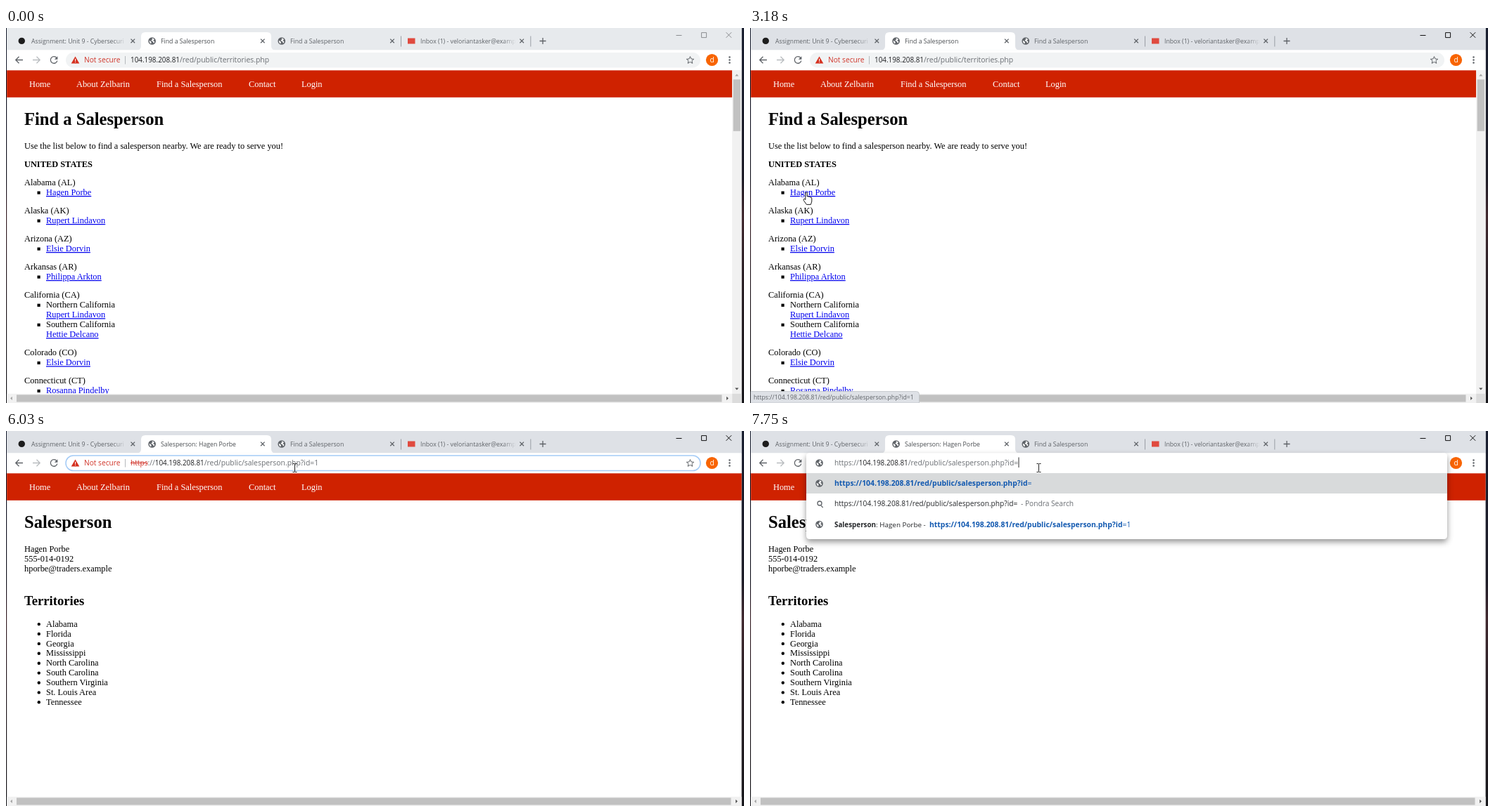
Recreate the animation shown at these times as an HTML page. Size 1049 px wide and 534 px high, loop 8000 ms.

```html
<!DOCTYPE html>
<html lang="en">
<head>
<meta charset="utf-8">
<title>Find a Salesperson</title>
<style>
  html, body { margin: 0; width: 100%; height: 100%; overflow: hidden; background: #fff; }
  svg { display: block; width: 100%; height: 100%; }
  text { white-space: pre; }
  .serif { font: 12.38px "Liberation Serif", "Times New Roman", serif; }
  .ui { font: 10.2px "Open Sans", "Noto Sans", sans-serif; fill: #26282b; }
  .small { font-size: 8.72px; }
  .h1 { font-size: 24.6px; font-weight: 700; }
  .h2 { font-size: 18.65px; font-weight: 700; }
  .b { font-weight: 700; }
  .nav { fill: #fff; }
  .link { fill: #0000ee; text-decoration: underline; }
  .host { fill: #202124; font-size: 9.9px; }
  .path { fill: #6a6e73; font-size: 10.4px; }
  .picked .host, .picked .path { fill: #202124; }
  .struck { fill: #d0342a; text-decoration: line-through; }
  .blue { fill: #1259b0; font-weight: 700; font-size: 10.4px; }
  .match { font-size: 9.85px; }
  .thin { font-weight: 400; }
  .grey { fill: #6a6e73; }
  .line { fill: none; stroke: #5f6368; stroke-width: 1.3; }
  #popup .sheet { filter: drop-shadow(0 4px 4px rgba(0, 0, 0, .42)); }
</style>
</head>
<body>
<svg id="stage" viewBox="0 0 1049 534" preserveAspectRatio="none"></svg>
<script>
const LOOP = 8000;
const PERSON = 'Hagen Porbe';
const HOST = '104.198.208.81';
const DIR = '/red/public/';
const PROFILE = DIR + 'salesperson.php?id=';

const rect = (x, y, w, h, fill, more = '') =>
  `<rect x="${x}" y="${y}" width="${w}" height="${h}" fill="${fill}" ${more}/>`;
const circle = (x, y, r, fill) => `<circle cx="${x}" cy="${y}" r="${r}" fill="${fill}"/>`;
const path = (d, more = 'class="line"') => `<path d="${d}" ${more}/>`;
const text = (x, y, cls, s, more = '') => `<text x="${x}" y="${y}" class="${cls}" ${more}>${s}</text>`;
const span = (cls, s) => `<tspan class="${cls}">${s}</tspan>`;
const group = (id, body, more = '') => `<g id="${id}" ${more}>${body}</g>`;
const serif = (x, y, s, cls = '') => text(x, y, 'serif ' + cls, s);
const fade = (id, x1, x2) =>
  `<linearGradient id="${id}" gradientUnits="userSpaceOnUse" x1="${x1}" x2="${x2}" y1="0" y2="0">
   <stop offset="0" stop-color="#5f6368"/><stop offset="1" stop-color="#5f6368" stop-opacity="0"/></linearGradient>`;

const globe = (x, y) => `<g transform="translate(${x} ${y})">` + circle(0, 0, 5.3, '#5f6368') +
  path('M-4 -.7L-1.7 .6L-.9 2L-1.6 3.9Q-4 2.8 -4 -.7ZM-.2 -3.9Q2 -4.2 3.3 -2.2L1.6 -.8L3.6 1Q3.4 2.4 2.2 3.2L1.4 1L-.4 0L-1.2 -1.2L.6 -2.2Z', 'fill="#fff"') + '</g>';
const cross = (x, y, r) => path(`M${x - r} ${y - r}l${2 * r} ${2 * r}M${x + r} ${y - r}l${-2 * r} ${2 * r}`);
const triangle = (x, y, dx, dy, fill) =>
  path(dx ? `M${x + dx} ${y}l${-2 * dx} -2.6v5.2Z` : `M${x} ${y + dy}l-2.6 ${-2 * dy}h5.2Z`, `fill="${fill}"`);

function address(x, y, scheme, file) {
  return text(x, y, 'ui', scheme + span('host', HOST) + span('path', file));
}

function desktop() {
  return `<linearGradient id="wall" x1="0" x2="0" y1="0" y2="1">
    <stop offset="0" stop-color="#1a1f30"/><stop offset=".4" stop-color="#1c1b26"/>
    <stop offset=".5" stop-color="#40282e"/><stop offset=".65" stop-color="#2b2026"/>
    <stop offset="1" stop-color="#17171b"/></linearGradient>` +
    rect(0, 0, 1049, 534, 'url(#wall)') + rect(1.2, 0, 1044.4, 534, '#fff');
}

function tabs() {
  const title = (x, s, fill = '#5f6368') => text(x, 21.8, 'ui small', s, `style="fill:${fill}"`);
  return fade('fadeA', 152, 171) + fade('fadeB', 706, 725) +
    rect(1.2, 0, 1044.4, 31.5, '#dee1e6', 'id="strip"') +
    path('M186 31.5Q192 31.5 192 25.5V12Q192 6 198 6H371Q377 6 377 12V25.5Q377 31.5 383 31.5Z', 'fill="#fff"') +
    circle(22.3, 18.4, 4.7, '#1d1d1d') + title(36, 'Assignment: Unit 9 - Cybersecuri', 'url(#fadeA)') +
    globe(207.6, 18.5) + group('tabA', title(220, 'Find a Salesperson', '#4a4e52')) +
    group('tabB', title(220, 'Salesperson: ' + PERSON, '#4a4e52')) +
    globe(391.8, 18.5) + title(404, 'Find a Salesperson') +
    rect(571, 14.5, 10.5, 8, '#e04a3f') + title(589, 'Inbox (1) - veloriantasker@examp', 'url(#fadeB)') +
    [180.3, 364.8, 549, 733.2].map(x => cross(x, 18.4, 2.8)).join('') +
    rect(561, 11.5, 1, 15, '#9a9ea5') + rect(745.3, 11.5, 1, 15, '#9a9ea5') +
    path('M758.5 18.5h9M763 14v9') +
    group('buttons', path('M952.5 10.5h8M988.6 6.6h7v7h-7ZM1023.6 6.2l7.6 7.6M1031.2 6.2l-7.6 7.6', ''),
      'fill="none" stroke-width="1"');
}

function toolbar() {
  return rect(1.2, 31.5, 1044.4, 28.5, '#fff') +
    path('M24 45.5h-10M18.5 40.8l-4.7 4.7l4.7 4.7') +
    path('M38 45.5h10M43.5 40.8l4.7 4.7l-4.7 4.7', 'class="line" style="stroke:#b9bcbf"') +
    path('M72 42.6A4.8 4.8 0 1 0 72.8 46.6') + path('M73.4 40.2v4.6h-4.6Z', 'fill="#5f6368"') +
    rect(85, 35, 902, 21.5, '#f1f3f4', 'rx="10.7" id="pill"') +
    path('M98.5 40.4L104.3 50.4H92.7Z', 'fill="#d5301f"') + rect(98, 43.8, 1.1, 3.2, '#fff') + rect(98, 47.8, 1.1, 1.1, '#fff') +
    text(111, 49.2, 'ui', 'Not secure', 'style="fill:#d0352a"') + rect(169, 40, 1, 11.5, '#b5b8bc') +
    path('M972.5 40.6l1.5 3.4l3.7 .3l-2.8 2.4l.9 3.6l-3.3 -1.9l-3.3 1.9l.9 -3.6l-2.8 -2.4l3.7 -.3Z', 'class="line" style="stroke-width:1"') +
    circle(1003.5, 45.5, 8.6, '#f86400') + text(1003.5, 49.1, 'ui', 'd', 'text-anchor="middle" style="fill:#fff"') +
    [41.4, 45.5, 49.6].map(y => circle(1028.5, y, 1.25, '#5f6368')).join('') +
    group('urlA', address(177, 49.2, '', DIR + 'territories.php')) +
    group('urlB', address(177, 49.2, '', PROFILE + '1')) +
    group('urlPicked', rect(177, 38, 232.5, 16, '#a9cdf7') + address(177, 49.2, '', PROFILE + '1'), 'class="picked"') +
    group('urlFull', address(177, 49.2, span('struck', 'https') + span('grey', '://'), PROFILE + '1'));
}

function navBar(width) {
  const items = [['Home', 33], ['About Zelbarin', 100], ['Find a Salesperson', 214], ['Contact', 345], ['Login', 420]];
  return rect(1.2, 60.3, width, 38.5, '#cf2200') + items.map(([s, x]) => serif(x, 84, s, 'nav')).join('');
}

function bottomBar(right, id) {
  return rect(1.2, 520.8, 1044.4, 13.2, '#f1f1f1') +
    rect(15, 522.3, right - 15, 10.2, '#c1c1c1', `id="${id}"`) +
    triangle(7.5, 527.3, -1.4, 0, '#a3a3a3') + triangle(right + 8, 527.3, 1.4, 0, '#505050');
}

function listPage() {
  const square = y => rect(44.5, y - 5.5, 4.2, 4.2, '#000');
  const link = (y, s) => serif(57, y, s, 'link');
  const state = (y, name, seller) => serif(26, y, name) + square(y + 14) + link(y + 14, seller);
  const region = (y, name, seller) => square(y) + serif(57, y, name) + link(y + 14, seller);
  return navBar(1031) +
    serif(26, 137.5, 'Find a Salesperson', 'h1') +
    serif(26, 171.5, 'Use the list below to find a salesperson nearby. We are ready to serve you!') +
    serif(26, 197.6, 'UNITED STATES', 'b') +
    state(224, 'Alabama (AL)', PERSON) +
    state(264, 'Alaska (AK)', 'Rupert Lindavon') +
    state(304, 'Arizona (AZ)', 'Elsie Dorvin') +
    state(344, 'Arkansas (AR)', 'Philippa Arkton') +
    serif(26, 384.3, 'California (CA)') +
    region(398.2, 'Northern California', 'Rupert Lindavon') +
    region(426.2, 'Southern California', 'Hettie Delcano') +
    state(466.3, 'Colorado (CO)', 'Elsie Dorvin') +
    state(506.3, 'Connecticut (CT)', 'Rosanna Pindelby') +
    bottomBar(1017.5, 'thumb') +
    rect(1032.2, 60, 13.4, 460.8, '#f1f1f1') + rect(1033.7, 73.3, 10.2, 73.5, '#c1c1c1') +
    triangle(1038.8, 67, 0, -1.4, '#a3a3a3') + triangle(1038.8, 514, 0, 1.4, '#505050') +
    rect(1032.2, 520.8, 13.4, 13.2, '#dcdcdc');
}

function profilePage() {
  const areas = ['Alabama', 'Florida', 'Georgia', 'Mississippi', 'North Carolina',
    'South Carolina', 'Southern Virginia', 'St. Louis Area', 'Tennessee'];
  return navBar(1044.4) +
    serif(26, 137.5, 'Salesperson', 'h1') +
    serif(26, 171.5, PERSON) + serif(26, 185.5, '555-014-0192') + serif(26, 199.5, 'hporbe@traders.example') +
    serif(26, 248, 'Territories', 'h2') +
    areas.map((s, i) => {
      const y = 278.7 + 13.9 * i;
      return circle(46.8, y - 3.6, 2.2, '#000') + serif(57, y, s);
    }).join('') + bottomBar(1030.5, 'thumbB');
}

function bubble(id, width, file) {
  return group(id, path(`M1.2 517.5H${width - 4}Q${width} 517.5 ${width} 521.5V534H1.2Z`, 'fill="#dee1e6" stroke="#c0c4c9" stroke-width=".8"') +
    text(5, 529, 'ui small', 'https://' + HOST + DIR + file, 'style="fill:#5f6368"'));
}

function popup() {
  const url = 'https://' + HOST + PROFILE.slice(0, -1);
  const lens = path('M101.2 106.4l2.4 2.6M102 103a3 3 0 1 1 -6 0a3 3 0 1 1 6 0');
  return group('popup',
    group('sheets', path('', 'id="sheet" class="sheet" fill="#fff"') +
      rect(80, 60, 911, 29, '#d8dadb') + rect(80, 89, 911, 29, '#e7e7e7', 'id="rowShade"')) +
    path('M80 60V36Q80 31.5 84.5 31.5H986.5Q991 31.5 991 36V60Z', 'fill="#fff"') +
    globe(98.5, 45.5) + address(120, 49.2, span('grey', 'https://'), PROFILE) +
    globe(98.5, 74.5) + text(120, 78.2, 'ui blue', url + span('thin', '=')) +
    lens + text(120, 107.4, 'ui', 'https://' + HOST + PROFILE) +
    text(385, 107.4, 'ui grey', '- Pondra Search') +
    group('rowLast', globe(98.5, 133) +
      text(120, 136.8, 'ui match', span('b', 'Salesperson') + ': ' + PERSON + ' -') +
      text(255, 136.8, 'ui blue', url + span('thin', '=1'))));
}

const cursors = () => group('cursor',
  group('arrow', path('M.4 .5V12.6L3.2 10L5.2 14.4L7.1 13.6L5.2 9.3H9Z', 'fill="#fff" stroke="#000" stroke-width=".9"')) +
  group('beam', path('M-3 -6H-1Q0 -6 0 -5Q0 -6 1 -6H3M0 -5V5M-3 6H-1Q0 6 0 5Q0 6 1 6H3', 'fill="none" stroke="#222" stroke-width="1"')) +
  group('hand', path('M-1.2 10.5V1.2Q-1.2 0 0 0Q1.2 0 1.2 1.2V6Q2.4 5 3.4 6.4Q4.6 5.6 5.6 7Q7.8 6.6 7.8 8.8V13L6.4 17.4H.4L-3.8 11.4Q-4.2 9.2 -2.6 9.2Z', 'fill="#fff" stroke="#000" stroke-width=".9"')));

document.getElementById('stage').innerHTML = desktop() + group('pageA', listPage()) + group('pageB', profilePage()) +
  tabs() + toolbar() + bubble('tipA', 240.5, 'salesperson.php?id=1') + bubble('tipB', 199.5, 'contact.php') +
  popup() + rect(444, 37.5, 1, 14.5, '#333', 'id="caret"') + cursors();

const el = {};
document.querySelectorAll('[id]').forEach(n => el[n.id] = n);

// Pointer stops: start time, kind, x, y; each holds until the next.
const STOPS = [
  [370, 'arrow', 772, 522], [445, 'arrow', 762, 484], [520, 'arrow', 757, 465],
  [920, 'arrow', 650, 448], [1005, 'arrow', 470, 419], [1090, 'arrow', 385, 406],
  [1390, 'arrow', 328, 385], [1465, 'arrow', 262, 360], [1540, 'arrow', 238, 351],
  [2000, 'arrow', 160, 301], [2080, 'arrow', 138, 286],
  [2390, 'arrow', 132, 281], [2460, 'arrow', 114, 266], [2540, 'arrow', 96, 250],
  [2620, 'hand', 84, 238], [2700, 'hand', 80, 234],
  [3320, 'arrow', 110, 216], [3400, 'arrow', 195, 165], [3475, 'arrow', 295, 110],
  [3550, 'hand', 348.7, 84.4], [3630, 'hand', 354, 82], [3705, 'hand', 362, 78],
  [3785, 'hand', 374, 74], [3860, 'arrow', 388, 64],
  [3930, 'beam', 401, 51], [4015, 'beam', 408, 49], [4100, 'beam', 409.5, 52.5],
  [4250, 'beam', 410.5, 52.5], [4560, 'arrow', 409, 52], [5490, 'beam', 410.5, 52.5]
];

const show = (id, on) => el[id].setAttribute('visibility', on ? 'visible' : 'hidden');
const alpha = (id, a) => el[id].setAttribute('opacity', a);
const steps = (t, ...pairs) => pairs.reduce((v, [at, next]) => t >= at ? next : v, 0);

function movePointer(t) {
  const stop = STOPS.findLast(s => t >= s[0]);
  for (const kind of ['arrow', 'beam', 'hand']) show(kind, !!stop && stop[1] === kind);
  if (stop) el.cursor.setAttribute('transform', `translate(${stop[2]} ${stop[3]})`);
}

function draw(t) {
  const active = t >= 3090, loaded = t >= 3245, focus = t >= 4480, full = t >= 5490;
  const open = t >= 7660, settled = t >= 7750;

  el.strip.setAttribute('fill', active ? '#dee1e6' : '#e7eaed');
  el.buttons.setAttribute('stroke', active ? '#111' : '#8b8d90');
  for (const id of ['pageA', 'tabA', 'urlA']) show(id, !loaded);
  for (const id of ['pageB', 'tabB']) show(id, loaded);
  el.thumb.setAttribute('fill', t >= 370 && t < 445 ? '#a8a8a8' : '#c1c1c1');

  alpha('tipA', steps(t, [2850, .5], [2920, 1], [3245, 0]));
  alpha('tipB', steps(t, [3550, 1], [4015, .5], [4100, 0]));

  el.pill.setAttribute('fill', focus ? '#fff' : '#f1f3f4');
  el.pill.setAttribute('stroke', focus ? '#a4cbf6' : 'none');
  el.pill.setAttribute('stroke-width', 1.5);
  show('urlB', loaded && !focus);
  show('urlPicked', focus && !full);
  show('urlFull', full && !open);

  el.popup.setAttribute('display', open ? 'inline' : 'none');
  const low = settled ? 154 : 125;
  el.sheet.setAttribute('d', `M80 36Q80 31.5 84.5 31.5H986.5Q991 31.5 991 36V${low - 5}Q991 ${low} 986 ${low}H85Q80 ${low} 80 ${low - 5}Z`);
  alpha('sheets', settled ? 1 : .85);
  show('rowShade', open && !settled);
  show('rowLast', settled);

  const lit = (t >= 5490 && t < 6030) || (t >= 6580 && t < 7130) || open;
  show('caret', lit);
  el.caret.setAttribute('x', open ? 381.5 : 444);
  movePointer(t);
}

function tick() {
  draw(performance.now() % LOOP);
  requestAnimationFrame(tick);
}
tick();
</script>
</body>
</html>
```
